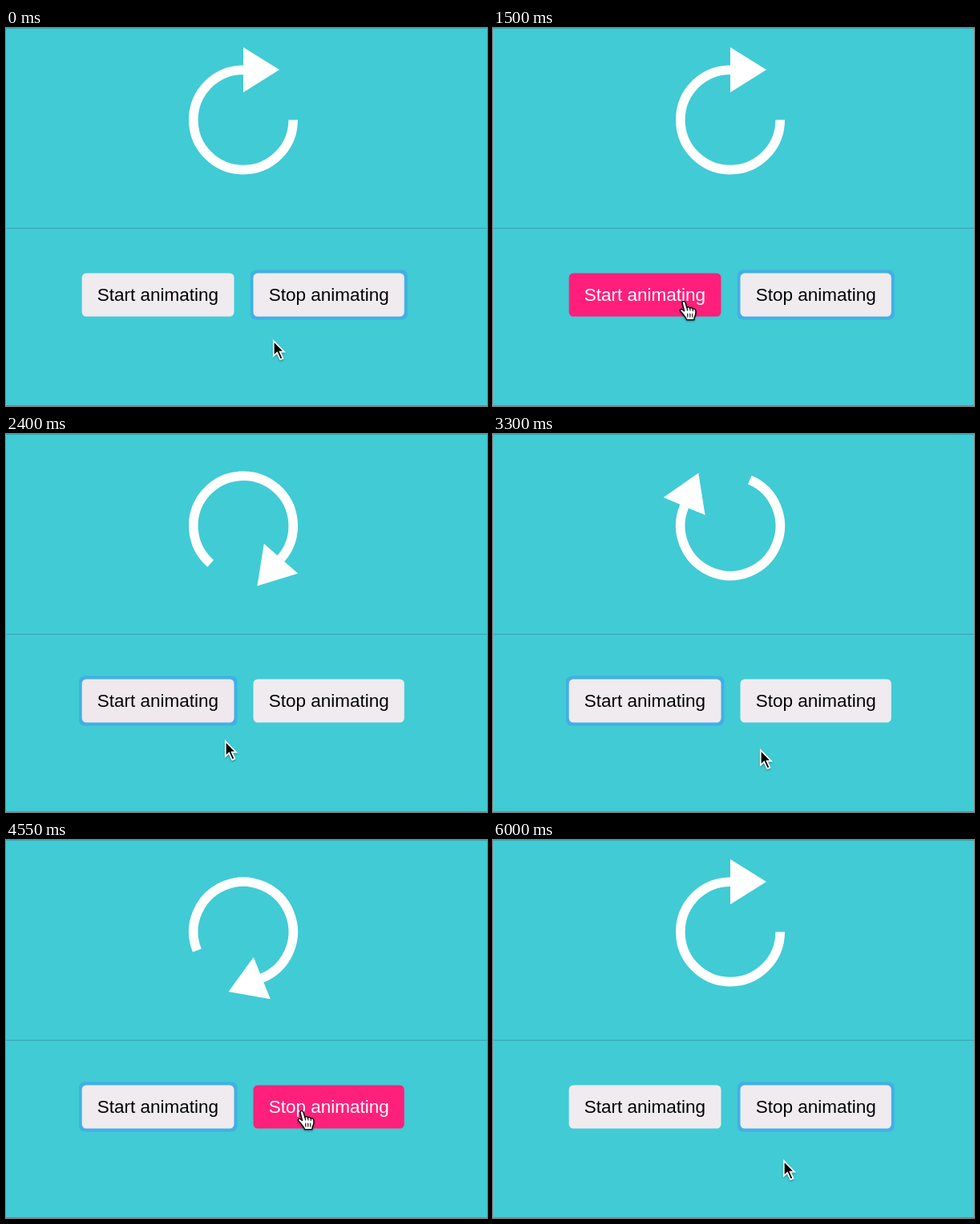
Write an HTML page that moves like this. It is 600 px wide and 471 px high and loops after 6800 ms.

```html
<!DOCTYPE html>
<html lang="en">
<head>
<meta charset="utf-8">
<title>Start and stop</title>
<style>
  html, body { margin: 0; width: 100%; height: 100%; overflow: hidden; background: #41cbd5; }
  svg { display: block; width: 600px; height: 471px; }
  text { font: 22.5px "Liberation Sans", Arial, sans-serif; text-anchor: middle; }
</style>
</head>
<body>
<svg viewBox="0 0 600 471">
  <defs>
    <filter id="shade" x="-50%" y="-50%" width="200%" height="200%">
      <feDropShadow dx="0" dy="1.2" stdDeviation="1" flood-opacity=".4"/>
    </filter>
    <filter id="soft" x="-5%" y="-15%" width="110%" height="130%">
      <feGaussianBlur stdDeviation=".5"/>
    </filter>
  </defs>
  <rect width="600" height="471" fill="#41cbd5"/>
  <path d="M0 .5H600M0 249.5H600M0 470.5H600" stroke="#35a5ae"/>

  <g id="spinner" fill="#fff">
    <path d="M62.2 0A62.2 62.2 0 1 1 0 -62.2" fill="none" stroke="#fff" stroke-width="11.6"/>
    <path d="M0 -90.5L45 -62.3L0 -34.2Z"/>
  </g>

  <g id="start">
    <rect class="ring" x="91" y="301.5" width="197.5" height="62" rx="7" fill="#41b0e5" filter="url(#soft)"/>
    <rect class="face" x="94.7" y="305.5" width="189.8" height="54" rx="5.5"/>
    <text x="189.3" y="340">Start animating</text>
  </g>
  <g id="stop">
    <rect class="ring" x="304.8" y="301.5" width="196" height="62" rx="7" fill="#41b0e5" filter="url(#soft)"/>
    <rect class="face" x="308.5" y="305.5" width="188.3" height="54" rx="5.5"/>
    <text x="402.7" y="340">Stop animating</text>
  </g>

  <g id="cursor" filter="url(#shade)">
    <path id="arrow" d="M.8 1.8V20.6L5.2 16.5L9.2 25L12.4 23.6L8.6 15.3H14Z"
      fill="#000" stroke="#fff" stroke-width="1.7"/>
    <g id="hand" stroke="#000" stroke-width="1.4" stroke-linejoin="round" stroke-linecap="round">
      <path fill="#fff" d="M-1.9 1.8C-2.2 -.6 .9 -1.2 1.8 .9L4 7.8C4.6 6.2 7 6.2 7.6 8.2C8.7 6.9 10.8 7.4 11.2 9.2
        C12.6 8.4 14.7 9.2 14.9 11.4C15.2 14.6 14.8 17 13.4 19.2L12.8 22.6H3.6C3.2 20.4 1 18.4 -.6 16
        C-2.2 13.8 -4 12.4 -4.6 11.2C-4.8 9.2 -2.4 8.8 -1 10.2L.6 11.6Z"/>
      <path fill="none" stroke-width="1.1" d="M4 7.8L4.6 11M7.6 8.2L8 11M11.2 9.2L11.3 11.6M4.8 15V19M7.8 15V19M10.8 15V19"/>
    </g>
  </g>
</svg>
<script>
const LOOP = 6800, STEP = 50;
const SPIN = { from: 1672, turn: 2000, turns: 2 };
const FADE = 300;
const FOCUS = [1620, 4700];
const PATH = [
  [0, 333, 388], [60, 333, 388], [480, 266, 357], [750, 242, 344], [1350, 238, 341],
  [2100, 238, 341], [2160, 249, 361], [2400, 273, 381], [2800, 329, 394], [3300, 333, 392],
  [4070, 333, 391], [4280, 356, 358], [4450, 369, 338], [4700, 369, 338], [5000, 368, 350],
  [5250, 368, 350], [5300, 368, 362], [5600, 361, 392], [5900, 362, 398], [LOOP, 362, 398]
];

const byId = id => document.getElementById(id);
const clamp = v => Math.min(1, Math.max(0, v));
const mix = (a, b, p) => `rgb(${a.map((v, i) => Math.round(v + (b[i] - v) * p))})`;

// cubic-bezier(.25, .1, .25, 1)
function ease(x) {
  const curve = (u, a, b) => 3 * u * (1 - u) * ((1 - u) * a + u * b) + u ** 3;
  let lo = 0, hi = 1;
  for (let i = 0; i < 20; i++) {
    const mid = (lo + hi) / 2;
    if (curve(mid, .25, .25) < x) lo = mid; else hi = mid;
  }
  return curve(lo, .1, 1);
}

function slope(i, axis) {
  const gradient = k => (PATH[k + 1][axis] - PATH[k][axis]) / (PATH[k + 1][0] - PATH[k][0]);
  if (i === 0 || i === PATH.length - 1) return 0;
  const a = gradient(i - 1), b = gradient(i);
  return a * b > 0 ? 2 * a * b / (a + b) : 0;
}

// Monotone cubic through the path points
function along(t, axis) {
  let i = 0;
  while (i < PATH.length - 2 && PATH[i + 1][0] <= t) i++;
  const a = PATH[i], b = PATH[i + 1], span = b[0] - a[0];
  const u = (t - a[0]) / span, s = u * u * (3 - 2 * u);
  return a[axis] + (b[axis] - a[axis]) * s
    + span * u * (1 - u) * ((1 - u) * slope(i, axis) - u * slope(i + 1, axis));
}

function makeButton(id, enter, leave) {
  const group = byId(id);
  const [ring, face, label] = [".ring", ".face", "text"].map(s => group.querySelector(s));
  return {
    over: t => t >= enter && t < leave,
    draw(t, focused) {
      const p = ease(clamp((t - enter) / FADE)) - ease(clamp((t - leave) / FADE));
      face.setAttribute("fill", mix([239, 235, 239], [255, 31, 123], p));
      label.setAttribute("fill", mix([0, 0, 0], [255, 255, 255], p));
      ring.style.display = focused ? "" : "none";
    }
  };
}

const start = makeButton("start", 480, 2150);
const stop = makeButton("stop", 4270, 5290);

function draw(t) {
  const angle = 360 * Math.min(SPIN.turns, Math.max(0, (t - SPIN.from) / SPIN.turn));
  byId("spinner").setAttribute("transform", `translate(296 114.4) rotate(${angle})`);

  const startFocused = t >= FOCUS[0] && t < FOCUS[1];
  start.draw(t, startFocused);
  stop.draw(t, !startFocused);

  const over = start.over(t) || stop.over(t);
  byId("hand").style.display = over ? "" : "none";
  byId("arrow").style.display = over ? "none" : "";
  byId("cursor").setAttribute("transform", `translate(${along(t, 1)} ${along(t, 2)})`);
}

const begin = performance.now();
function tick() {
  const t = (performance.now() - begin) % LOOP;
  draw(Math.floor(t / STEP) * STEP);
  requestAnimationFrame(tick);
}
tick();
</script>
</body>
</html>
```
